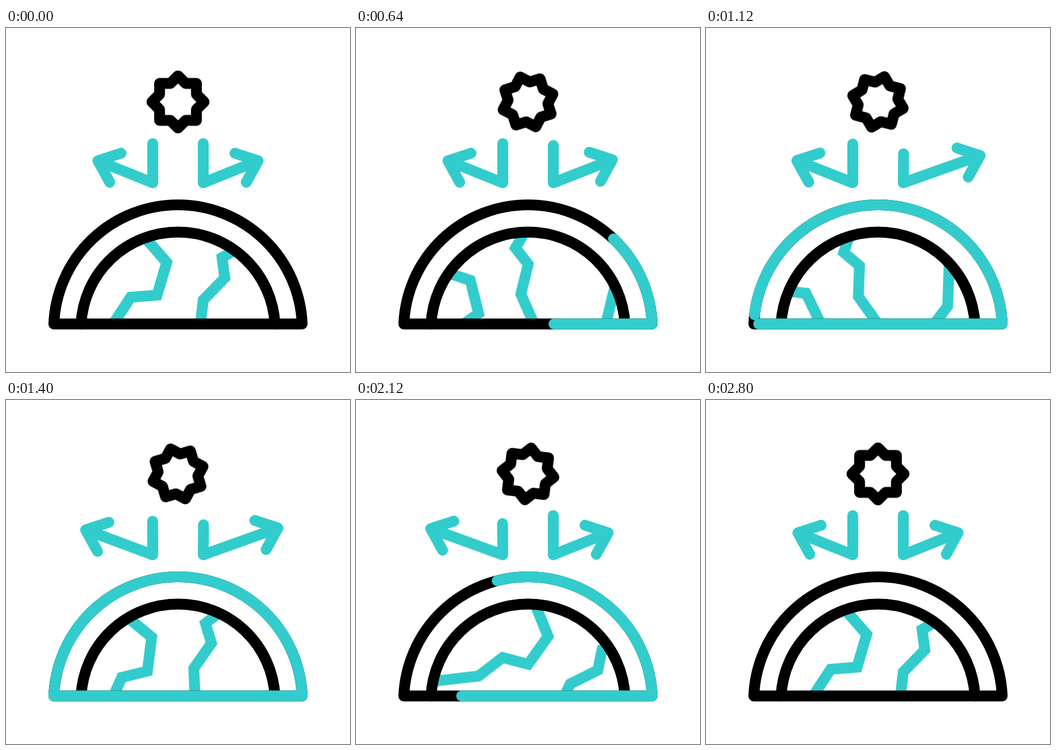
Animation, 640 px wide and 640 px high, one loop 3 s. Source, as an HTML page without scripts:

```html
<!DOCTYPE html>
<html lang="en">
<head>
<meta charset="utf-8">
<title>Rays reflected by a dome</title>
<style>
  :root {
    --ease: cubic-bezier(.333, 0, .667, 1);
    --teal: #33cccc;
  }
  html, body { margin: 0; width: 100%; height: 100%; overflow: hidden; background: #fff; }
  svg { display: block; width: 100%; height: 100%; }
  path { fill: none; stroke: #000; stroke-width: 20.2; stroke-linecap: round; stroke-linejoin: round; }
  .teal, .cracks path { stroke: var(--teal); }
  .cracks path { stroke-linejoin: miter; }

  .star, .cracks, .arrow, .sweep {
    animation: 3s var(--ease) infinite;
  }
  .star { animation-name: spin; }
  .cracks { animation-name: sway; transform-origin: 317px 611px; }
  .arrow { d: path("M273 215L273 288L171 247M214 233L171 247L193 287"); }
  .right { animation-name: reach-first; }
  .left { animation-name: reach-second; }
  .sweep { stroke-dasharray: 1 2; stroke-dashoffset: 1.005; }
  .base { animation-name: sweep-base; }
  .arc { animation-name: sweep-arc; }

  @keyframes spin {
    0%, 6.667% { transform: rotate(0deg); animation-timing-function: cubic-bezier(.34, 0, .7, .535); }
    54.667% { transform: rotate(218.6deg); animation-timing-function: cubic-bezier(.25, .48, .41, 1); }
    93.333%, 100% { transform: rotate(360deg); }
  }
  @keyframes sway {
    0%, 6.667% { transform: rotate(0deg); }
    32% { transform: rotate(-49.3deg); }
    60.83% { transform: rotate(28.4deg); }
    86.667%, 100% { transform: rotate(0deg); }
  }
  @keyframes reach-first {
    0%, 14.33%, 63.1%, 100% { d: path("M273 215L273 288L171 247M214 233L171 247L193 287"); }
    39.67%, 42.17% { d: path("M272.5 234.5L273 288L129 237M172 223L129 237L151 277"); }
  }
  @keyframes reach-second {
    0%, 34.33%, 85.5%, 100% { d: path("M273 215L273 288L171 247M214 233L171 247L193 287"); }
    57.73%, 63.8% { d: path("M272.5 234.5L273 288L129 237M172 223L129 237L151 277"); }
  }
  @keyframes sweep-base {
    0%, 10.33%, 93.333%, 100% { stroke-dashoffset: 1.005; }
    40%, 59.17% { stroke-dashoffset: 0; }
  }
  @keyframes sweep-arc {
    0%, 10.33%, 91.5%, 100% { stroke-dashoffset: 1.005; }
    40%, 55.5% { stroke-dashoffset: 0; }
  }
</style>
</head>
<body>
<svg viewBox="0 0 640 640">
  <clipPath id="inside">
    <path d="M139.7 550.6A180.55 180.55 0 0 1 500.3 550.6Z"/>
  </clipPath>

  <g transform="translate(320 137.5)">
    <path class="star" d="M0-48.5L14.2-34.3H34.3V-14.2L48.5 0L34.3 14.2V34.3H14.2L0 48.5L-14.2 34.3H-34.3V14.2L-48.5 0L-34.3-14.2V-34.3H-14.2Z"/>
  </g>

  <path class="teal arrow left"/>
  <g transform="matrix(-1 0 0 1 640 0)"><path class="teal arrow right"/></g>

  <g clip-path="url(#inside)">
    <g class="cracks">
      <path d="M250 380L299 436L281 497L232 501L201 548L85 604"/>
      <path d="M440 406L402 427L407 465L367 506L360 565"/>
      <path d="M546 561L478 631L425 641"/>
    </g>
  </g>

  <path d="M139.7 550.6A180.55 180.55 0 0 1 500.3 550.6"/>
  <path d="M89 550.6H551A231.2 231.2 0 0 0 89 550.6Z"/>
  <path class="teal sweep base" pathLength="1" d="M493 550.6H89"/>
  <path class="teal sweep arc" pathLength="1" d="M493 550.6H551A231.2 231.2 0 0 0 89 550.6"/>
</svg>
</body>
</html>
```
